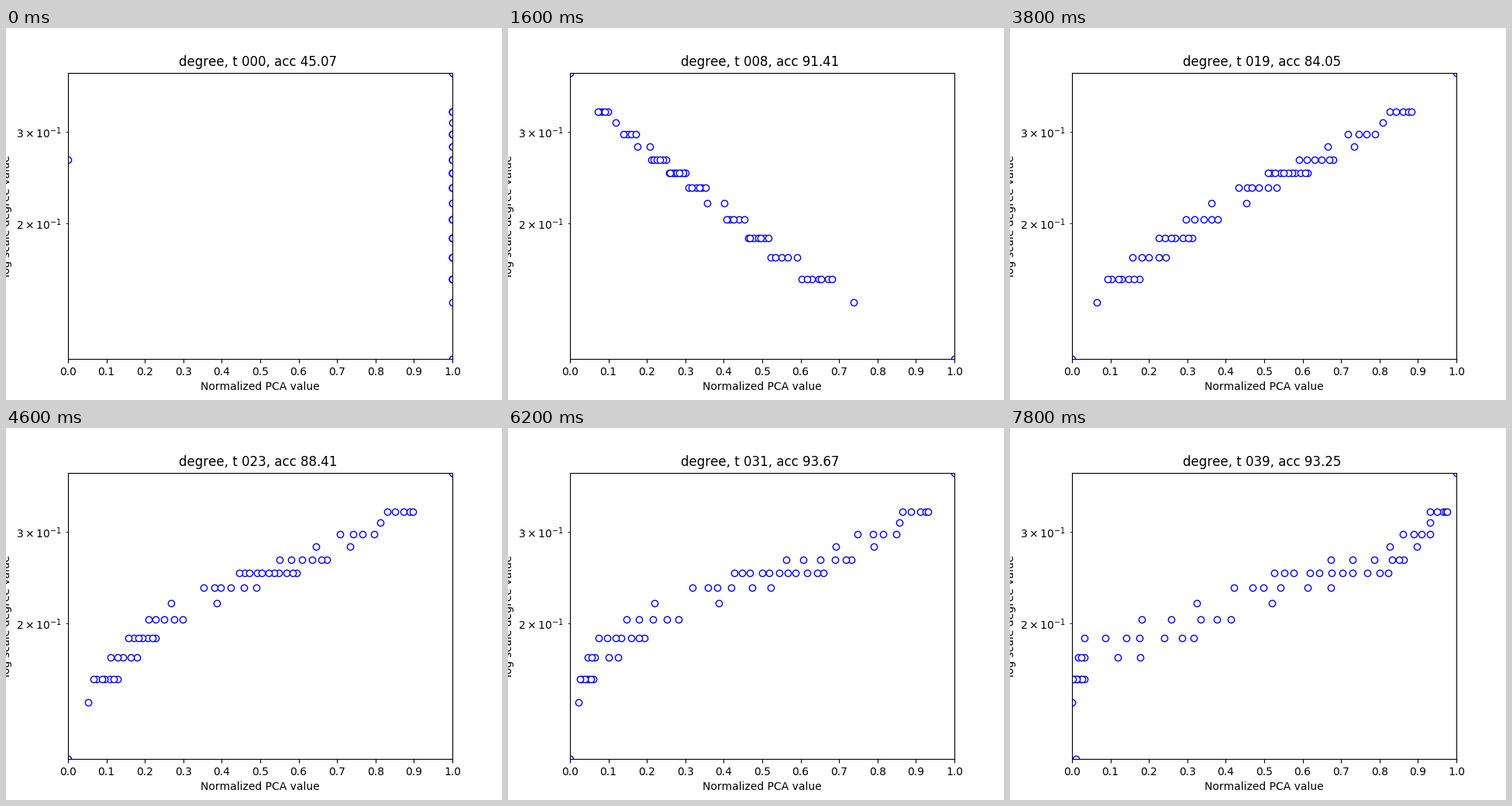
Write a matplotlib script that moves like this. It is 640 px wide and 480 px high and loops after 8 s.

```python
import numpy as np
import matplotlib.pyplot as plt
from matplotlib.animation import FuncAnimation

FRAMES, STEP_MS = 40, 200
FLIP = 17              # the PCA axis changes sign at this step
NODES = 64             # degree is normalised by this count

plt.rcParams["text.kerning_factor"] = 6
rng = np.random.default_rng(4)

DEGREES = [7, *range(9, 22), 25]
COUNTS = [1, 1, 7, 5, 7, 5, 2, 6, 11, 6, 2, 4, 1, 5, 1]

# PCA value against degree, bent further at each key step
KNOTS = [7, 9, 11, 13, 15, 17, 21, 25]
KEYS = [8, 15, 19, 27, 39]
CURVES = np.array([
    [0, .263, .450, .573, .669, .772, .918, 1],
    [0, .193, .367, .471, .569, .695, .878, 1],
    [0, .065, .200, .339, .478, .645, .862, 1],
    [0, .038, .085, .150, .345, .612, .887, 1],
    [0, -.010, .022, .318, .515, .825, .967, 1]])


def row_offsets(count):
    """Uneven spread over -1..1 for nodes that share a degree."""
    if count == 1:
        return np.zeros(1)
    jitter = rng.uniform(-0.6, 0.6, count) / count
    return np.clip(np.linspace(-1, 1, count) + jitter, -1, 1)


degree = np.repeat(DEGREES, COUNTS)
offset = np.concatenate([row_offsets(n) for n in COUNTS])
order = rng.permutation(degree.size)
accuracy = np.interp(range(FRAMES), [0, 8, 15, 19, 27, 35, 39],
                     [45.07, 91.41, 70.91, 84.05, 92.78, 94.56, 93.25])
best = accuracy.argmax()


def positions(t):
    if t == 0:             # untrained: one outlier, all others together
        x = np.ones(degree.size)
        x[np.argmax(degree == 17)] = 0
        return x
    curve = [np.interp(t, KEYS, column) for column in CURVES.T]
    spread = 0.3 + 0.018 * t
    x = np.interp(degree + spread * offset, KNOTS, curve)
    x = (x - x.min()) / (x.max() - x.min())
    return x if t >= FLIP else 1 - x


fig, ax = plt.subplots(figsize=(6.4, 4.8), dpi=100)
ax.set_yscale("log")
ax.set_xlim(0, 1)
ax.set_ylim(7 / NODES, 25 / NODES)
ax.set_xticks(np.arange(11) / 10)
ax.set_xlabel("Normalized PCA value")
ax.set_ylabel("log scale degree value")
title = ax.set_title("")
dots, = ax.plot([], [], "o", mfc="white", mec="blue", ms=6)


def update(t):
    dots.set_data(positions(t)[order], degree[order] / NODES)
    mark = "*" if t == best else " "
    title.set_text(f"degree, t {t:03d}, acc {accuracy[t]:.2f}{mark}")
    return dots, title


anim = FuncAnimation(fig, update, frames=FRAMES, interval=STEP_MS,
                     init_func=lambda: update(0), repeat=True, repeat_delay=0)
plt.show()
```
